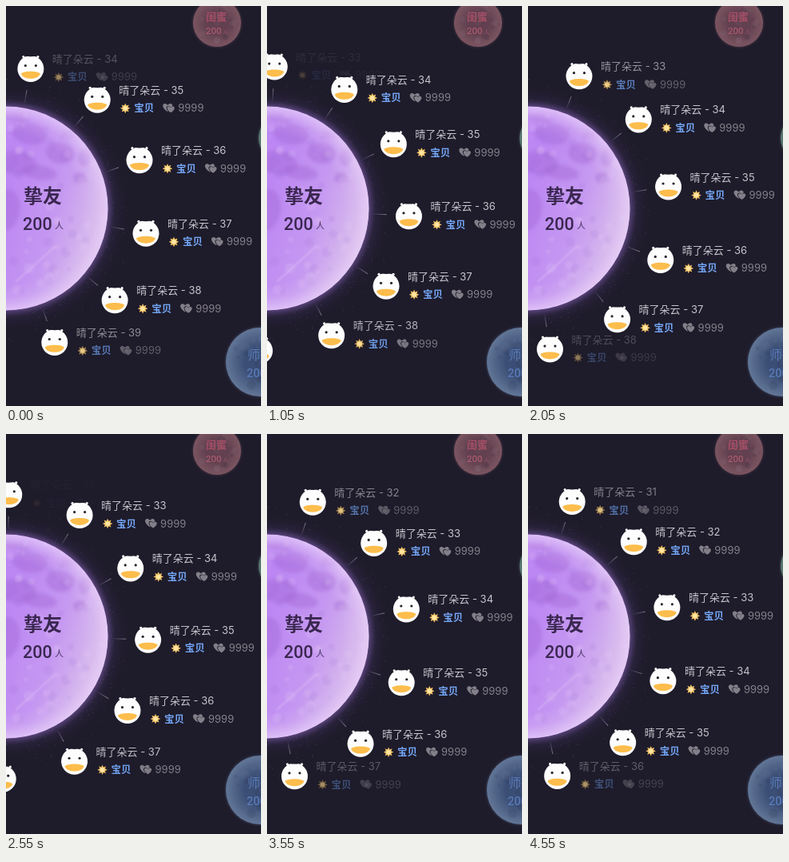
Recreate the animation shown at these times as an HTML page with a canvas. Size 319 by 500 pixels, loop 4.6 s.

```html
<!DOCTYPE html>
<html lang="zh-CN">
<head>
<meta charset="utf-8">
<style>
html, body { margin: 0; width: 100%; height: 100%; overflow: hidden; background: #1e1b2a; }
canvas { display: block; }
</style>
</head>
<body>
<canvas id="stage" width="319" height="500"></canvas>
<script>
const W = 319, H = 500, LOOP = 4600, STEP = 50, TAU = Math.PI * 2;
const CY = 253, MOON_R = 127.5, ORBIT = 177.7;
const FONT = 'Inter, "Noto Sans CJK SC", "Noto Sans CJK", sans-serif';
const NUMBERS = 'Roboto, "Noto Sans CJK SC", "Noto Sans CJK", sans-serif';
// [ms, degrees] of the hand-dragged wheel
const DRAG = [[0, 0], [500, 10], [1050, 23], [2050, 41.1], [2200, 43],
  [2750, 55.5], [3050, 58.5], [3550, 68.8], [4550, 98.1], [4600, 99.5]];

const ctx = document.getElementById('stage').getContext('2d');
const backdrop = document.createElement('canvas');
backdrop.width = W;
backdrop.height = H;

let seed = 7;
const random = () => (seed = (seed * 16807) % 2147483647) / 2147483647;

function disc(c, x, y, r, fill) {
  c.fillStyle = fill;
  c.beginPath();
  c.arc(x, y, r, 0, TAU);
  c.fill();
}

function oval(c, x, y, rx, ry, fill, tilt = 0) {
  c.fillStyle = fill;
  c.beginPath();
  c.ellipse(x, y, rx, ry, tilt, 0, TAU);
  c.fill();
}

function label(c, text, x, y, size, fill, weight = 400, family = FONT) {
  c.font = `${weight} ${size}px ${family}`;
  c.fillStyle = fill;
  c.fillText(text, x, y);
}

function radial(c, x, y, r0, r1, ...stops) {
  const g = c.createRadialGradient(x, y, r0, x, y, r1);
  stops.forEach((color, i) => g.addColorStop(i / (stops.length - 1), color));
  return g;
}

function drawMoon(c) {
  disc(c, 0, CY, 160, radial(c, 0, CY, 124, 160,
    'rgba(170,125,225,.6)', 'rgba(110,80,165,.13)', 'rgba(70,55,110,.04)', 'rgba(30,27,42,0)'));
  for (let i = 0; i < 90; i++) {
    const a = (random() - .5) * Math.PI, r = MOON_R + 4 + 34 * random() ** 1.5;
    disc(c, r * Math.cos(a), CY + r * Math.sin(a), .6, 'rgba(175,160,205,.22)');
  }
  c.save();
  c.beginPath();
  c.arc(0, CY, MOON_R, 0, TAU);
  c.clip();
  const body = c.createLinearGradient(0, 235, 126, 270);
  body.addColorStop(0, '#bc87f3');
  body.addColorStop(.5, '#c598f1');
  body.addColorStop(1, '#dcc1eb');
  c.fillStyle = body;
  c.fillRect(0, 120, 130, 266);
  c.filter = 'blur(2px)';
  [[13, 140, 17, 5], [30, 160, 22, 13], [68, 184, 18, 13], [99, 189, 8, 11], [14, 196, 24, 15],
    [93, 215, 9, 7], [42, 208, 22, 9], [78, 160, 9, 5], [0, 255, 17, 26]]
    .forEach(([x, y, rx, ry]) => oval(c, x, y, rx, ry, 'rgba(163,104,212,.42)', .15));
  c.filter = 'blur(1px)';
  for (let i = 0; i < 80; i++) {
    const fill = i % 3 ? 'rgba(235,210,250,.16)' : 'rgba(150,95,205,.12)';
    disc(c, random() * 125, 130 + random() * 245, 1 + random() * 6, fill);
  }
  c.strokeStyle = 'rgba(232,208,250,.35)';
  c.lineWidth = 2;
  c.beginPath();
  c.moveTo(12, 345);
  c.lineTo(62, 300);
  c.stroke();
  c.filter = 'none';
  disc(c, 0, CY, MOON_R, radial(c, 0, CY, 95, MOON_R,
    'rgba(225,200,245,0)', 'rgba(225,200,245,.22)', 'rgba(232,208,248,.75)'));
  c.restore();
  label(c, '挚友', 22, 246, 24, '#3a2750', 700);
  label(c, '200', 21, 280, 21.5, '#3a2750', 500, NUMBERS);
  label(c, '人', 61, 279, 11, '#49355f', 500);
}

function drawPlanet(c, x, y, r, inner, outer, rim) {
  disc(c, x, y, r + 4, radial(c, x, y, r - 2, r + 4, rim, 'rgba(30,27,42,0)'));
  disc(c, x, y, r, radial(c, x, y, r * .45, r, inner, outer));
  for (let i = 0; i < 24; i++) {
    const a = random() * TAU, d = random() * r * .85;
    const fill = i % 2 ? 'rgba(25,25,45,.1)' : 'rgba(190,190,210,.05)';
    disc(c, x + d * Math.cos(a), y + d * Math.sin(a), 1 + random() * r / 8, fill);
  }
}

function drawBackdrop(c) {
  c.textBaseline = 'alphabetic';
  c.fillStyle = '#1e1b2a';
  c.fillRect(0, 0, W, H);
  drawMoon(c);
  drawPlanet(c, 264, 21, 30, '#62404f', '#7b5561', 'rgba(125,85,98,.6)');
  label(c, '闺蜜', 250, 18, 13, '#a54f67', 700);
  label(c, '200', 250, 35, 11.5, '#a85a6e', 500, NUMBERS);
  label(c, '人', 271, 35, 7, '#92506a');
  drawPlanet(c, 318, 445, 43, '#3b4e75', '#627697', 'rgba(95,118,155,.6)');
  label(c, '师徒', 302, 442, 16, '#5879b5', 500);
  label(c, '200', 301, 464, 14.5, '#5879b5', 500, NUMBERS);
  drawPlanet(c, 345, 165, 29, '#46605f', '#5b7a73', 'rgba(85,120,112,.6)');
}

function wheelAngle(t) {
  const slope = i => {
    const a = DRAG[Math.max(i - 1, 0)], b = DRAG[Math.min(i + 1, DRAG.length - 1)];
    return (b[1] - a[1]) / (b[0] - a[0]);
  };
  let i = 0;
  while (i < DRAG.length - 2 && t >= DRAG[i + 1][0]) i++;
  const [t0, p0] = DRAG[i], [t1, p1] = DRAG[i + 1];
  const d = t1 - t0, u = (t - t0) / d, v = 1 - u;
  return v * v * ((1 + 2 * u) * p0 + u * d * slope(i)) + u * u * ((1 + 2 * v) * p1 - v * d * slope(i + 1));
}

function drawDuck(x, y) {
  disc(ctx, x, y + .5, 16.5, '#fdfdfd');
  for (const side of [-1, 1]) disc(ctx, x + side * 9, y - 14.5, 1.6, '#fdfdfd');
  // the head is flat between the ears
  oval(ctx, x, y - 16.3, 7.5, 1.6, '#1e1b2a');
  for (const side of [-1, 1]) disc(ctx, x + side * 6.5, y - 3.5, 1.6, '#29252f');
  ctx.fillStyle = '#fcbd4c';
  ctx.beginPath();
  ctx.moveTo(x - 12, y + 6.5);
  ctx.bezierCurveTo(x - 8, y + 3, x + 8, y + 3, x + 12, y + 6.5);
  ctx.bezierCurveTo(x + 10, y + 15, x - 10, y + 15, x - 12, y + 6.5);
  ctx.fill();
}

function drawStar(x, y) {
  ctx.fillStyle = '#f5c466';
  ctx.beginPath();
  for (let i = 0; i < 16; i++) {
    const r = i % 2 ? 3.6 : 6.3, a = i * TAU / 16;
    ctx.lineTo(x + r * Math.cos(a), y + r * Math.sin(a));
  }
  ctx.fill();
  disc(ctx, x, y, 2.8, '#ffe6a0');
}

function drawHeart(x, y, s, fill) {
  ctx.fillStyle = fill;
  ctx.beginPath();
  ctx.moveTo(x, y + 5 * s);
  ctx.bezierCurveTo(x - 10 * s, y - 1 * s, x - 5 * s, y - 8 * s, x, y - 3 * s);
  ctx.bezierCurveTo(x + 5 * s, y - 8 * s, x + 10 * s, y - 1 * s, x, y + 5 * s);
  ctx.fill();
}

function drawRay(angle) {
  ctx.save();
  ctx.translate(0, CY);
  ctx.rotate(angle);
  const g = ctx.createLinearGradient(134, 0, 150, 0);
  g.addColorStop(0, 'rgba(190,180,215,.08)');
  g.addColorStop(1, 'rgba(200,195,215,.55)');
  ctx.fillStyle = g;
  ctx.fillRect(134, -.5, 16, 1);
  ctx.restore();
}

function drawFriend(number, degrees) {
  const a = degrees * TAU / 360;
  const x = ORBIT * Math.cos(a), y = CY + ORBIT * Math.sin(a);
  drawRay(a);
  drawDuck(x, y);
  ctx.globalAlpha = Math.max(0, Math.min(1, (90 - Math.abs(degrees)) / 30));
  label(ctx, `晴了朵云 - ${number}`, x + 27, y - 7, 13, '#c6c4cc');
  drawStar(x + 35, y + 11);
  label(ctx, '宝贝', x + 46, y + 15.5, 12.5, '#74a7f7', 700);
  drawHeart(x + 88, y + 10, 1.05, '#827f89');
  drawHeart(x + 92, y + 12.5, .95, '#1e1b2a');
  drawHeart(x + 92, y + 12.5, .8, '#827f89');
  label(ctx, '9999', x + 101, y + 15.5, 13, '#85828c');
  ctx.globalAlpha = 1;
}

function render(now) {
  const t = Math.floor((now % LOOP) / STEP) * STEP;
  const turn = wheelAngle(t);
  ctx.drawImage(backdrop, 0, 0);
  for (let n = 30; n <= 40; n++) {
    const degrees = (n - 34) * 30 - 80 + turn;
    if (Math.abs(degrees) < 97) drawFriend(n, degrees);
  }
}

drawBackdrop(backdrop.getContext('2d'));
let start;
function tick(now) {
  start ??= now;
  render(now - start);
  requestAnimationFrame(tick);
}
render(0);
requestAnimationFrame(tick);
</script>
</body>
</html>
```
